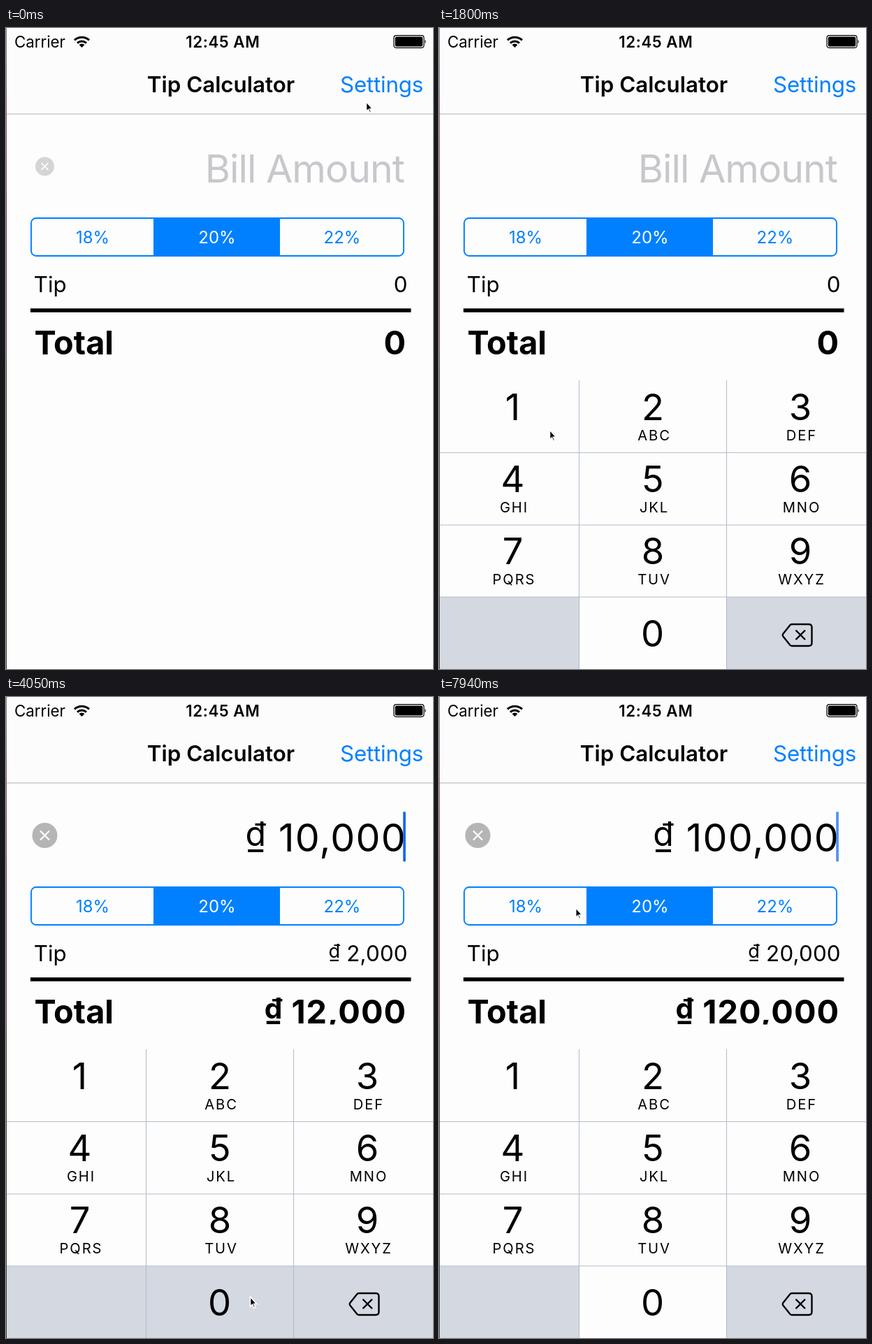
An HTML page that plays this animation: 611 px wide and 917 px high, repeating every 8 s.

```html
<!DOCTYPE html>
<html lang="en">
<head>
<meta charset="utf-8">
<title>Tip Calculator</title>
<style>
  html, body { margin: 0; width: 100%; height: 100%; overflow: hidden; background: #fdfdfd; }
  svg { display: block; width: 611px; height: 917px; font-family: Inter, "Noto Sans", sans-serif; }
  .mid { text-anchor: middle; }
  .end { text-anchor: end; }
  .blue { fill: #0080ff; }
  .body { font-size: 31.3px; }
  .status { font-size: 22.3px; }
  .seg { font-size: 24px; text-anchor: middle; }
  .amount { font-size: 55.5px; text-anchor: end; }
  .total { font-size: 46.8px; font-weight: 700; }
  .digit { font-size: 52.5px; text-anchor: middle; }
  .letters { font-size: 20.2px; letter-spacing: 1.9px; text-anchor: middle; }
  .dong { font-size: .87em; baseline-shift: .17em; }
</style>
</head>
<body>
<svg viewBox="0 0 611 917">
  <defs>
    <linearGradient id="edge" x2="0" y2="1">
      <stop offset="0" stop-color="#8a7c80"/>
      <stop offset=".3" stop-color="#6b3a48"/>
      <stop offset=".5" stop-color="#6b3a48"/>
      <stop offset=".54" stop-color="#34452f"/>
      <stop offset="1" stop-color="#34452f"/>
    </linearGradient>
    <clipPath id="totalBox"><rect y="410" width="611" height="58.5"/></clipPath>
  </defs>
  <rect width="611" height="917" fill="#fdfdfd"/>

  <!-- status and navigation bars -->
  <rect width="611" height="122.5" fill="#fcfcfc"/>
  <rect y="122.5" width="611" height="1" fill="#b2b2b4"/>
  <text class="status" x="12" y="28">Carrier</text>
  <g fill="none" stroke="#000" stroke-width="3">
    <path d="M98 17.3A15.3 15.3 0 0 1 119 17.3"/>
    <path d="M102 21.6A9.5 9.5 0 0 1 115 21.6"/>
  </g>
  <path d="M108.5 28L104.6 24.1A5.6 5.6 0 0 1 112.4 24.1Z"/>
  <text class="status mid" x="310.3" y="28" font-weight="600" letter-spacing=".6">12:45 AM</text>
  <rect x="555" y="10.7" width="43" height="17.6" rx="3.5" fill="none" stroke="#000" stroke-width="1.2"/>
  <rect x="556.8" y="12.5" width="39.4" height="14" rx="2"/>
  <path d="M599.5 16.5Q601.8 19.5 599.5 22.5Z"/>
  <text class="body mid" x="307.5" y="92" font-weight="600">Tip Calculator</text>
  <text class="body blue end" x="597" y="92" letter-spacing="-.2">Settings</text>

  <!-- bill -->
  <g id="clear">
    <circle r="18" fill="#b5b5b5"/>
    <path d="M-6.5-6.5L6.5 6.5M6.5-6.5L-6.5 6.5" stroke="#fff" stroke-width="2.2"/>
  </g>
  <text id="hint" class="amount" x="570" y="221" fill="#c7c7cc" letter-spacing="-1">Bill Amount</text>
  <text id="bill" class="amount" x="573" y="221" letter-spacing="1.2"></text>
  <rect id="caret" x="568.2" y="164" width="3.7" height="71.5" rx="1.5" fill="#1268ec"/>

  <!-- tip rate -->
  <rect x="36" y="272" width="533" height="54" rx="7" fill="none" stroke="#0080ff" stroke-width="1.9"/>
  <rect x="211" y="271.5" width="181" height="55" fill="#0080ff"/>
  <text class="seg blue" x="124" y="307.5">18%</text>
  <text class="seg" x="302" y="307.5" fill="#fff">20%</text>
  <text class="seg blue" x="481" y="307.5">22%</text>

  <text class="body" x="39.8" y="378">Tip</text>
  <text id="tip" class="body end" x="574.8" y="378" letter-spacing=".2"></text>
  <rect x="35" y="401.2" width="544.5" height="5.5"/>
  <g clip-path="url(#totalBox)">
    <text class="total" x="40.5" y="466.5">Total</text>
    <text id="total" class="total end" x="573" y="466.5" letter-spacing="1"></text>
  </g>

  <g id="keyboard">
    <rect y="504" width="611" height="413" fill="#fdfdfd"/>
    <path d="M0 814H200V917H0ZM412 814H611V917H412Z" fill="#d4d8e0"/>
    <rect id="keyOne" y="504" width="200" height="103" fill="#d4d8e0"/>
    <rect id="keyZero" x="201" y="814" width="211" height="103" fill="#d4d8e0"/>
    <path d="M200.5 504V917M411.5 504V917M0 607.5H611M0 711H611M0 814H611" stroke="#b4becb" stroke-width="1.1"/>
    <g id="keys"></g>
    <path d="M505 853H529Q533.5 853 533.5 857.5V879.5Q533.5 884 529 884H505Q503.5 884 502.5 883L492.5 870.5Q491 868.5 492.5 866.5L502.5 854Q503.5 853 505 853ZM510.5 861.5L524 875M524 861.5L510.5 875"
      fill="none" stroke="#000" stroke-width="2.4" stroke-linejoin="round"/>
  </g>

  <rect width="1" height="917" fill="url(#edge)"/>
  <path id="pointer" d="M0 0V14L3 11.2L5.2 16L7.2 15.1L5.2 10.3H9Z" stroke="#fff" stroke-width="1.6"/>
</svg>
<script>
const LOOP = 8000;
const $ = id => document.getElementById(id);
const clamp = v => Math.max(0, Math.min(1, v));

const letters = ["", "ABC", "DEF", "GHI", "JKL", "MNO", "PQRS", "TUV", "WXYZ"];
const columns = [105.5, 306, 517];
$("keys").innerHTML = letters.map((label, i) => {
  const x = columns[i % 3], y = 561 + 103 * Math.floor(i / 3);
  return `<text class="digit" x="${x}" y="${y}">${i + 1}</text>` +
    `<text class="letters" x="${x + 2}" y="${y + 29}">${label}</text>`;
}).join("") + '<text class="digit" x="305.5" y="884.5">0</text>';

// [time, bill]
const bills = [[0, 0], [2250, 1], [2700, 10], [3150, 100], [3900, 1000], [4050, 10000], [4350, 100000]];
// [from, to] of each press on the zero key
const zeroPresses = [[2550, 2700], [2850, 3150], [3750, 3900], [4050, 4500]];
// [time, x, y]
const route = [
  [0, 515.5, 105.5], [700, 515.5, 105.5], [1050, 450, 240], [1350, 230, 600], [1500, 172, 648],
  [1800, 158.5, 575], [2150, 158.5, 575], [2550, 349.5, 858], [5900, 349.5, 858], [6890, 350, 853],
  [7340, 290, 600], [7640, 215, 350], [7800, 195.7, 301.5], [LOOP, 195.7, 301.5]
];

const grouped = v => String(v).replace(/\B(?=(\d{3})+$)/g, ",");
const dong = v => `<tspan class="dong">₫</tspan> ${grouped(v)}`;

// The picture advances in 150 ms steps, with one short step before 5990.
const snap = t => t < 5990
  ? Math.floor(t / 150) * 150
  : 5990 + Math.floor((t - 5990) / 150) * 150;

function pointerAt(t) {
  const i = Math.max(1, route.findIndex(p => p[0] > t));
  const [t0, x0, y0] = route[i - 1], [t1, x1, y1] = route[i];
  const k = (t - t0) / (t1 - t0);
  return [x0 + (x1 - x0) * k, y0 + (y1 - y0) * k];
}

function caretAlpha(t) {
  if (t < 150) return 0;
  if (t >= 2250 && t < 4900) return 1;
  const phase = (t - (t < 2250 ? 560 : 4900) + 1000) % 1000;
  return phase < 430 ? clamp(1 - phase / 150) : clamp((phase - 430) / 150);
}

function clearState(t) {
  if (t < 300) return [0.75 - t / 450, 0.55 - t / 350];
  if (t < 2250) return [0, 0];
  const k = clamp((t - 2100) / 300);
  return [0.5 + k / 2, k];
}

const show = (id, on) => $(id).setAttribute("visibility", on ? "visible" : "hidden");

function draw(time) {
  const t = snap(time);
  const bill = bills.filter(b => b[0] <= t).pop()[1];
  $("bill").innerHTML = bill ? dong(bill) : "";
  $("tip").innerHTML = bill ? dong(Math.round(bill * 0.2)) : "0";
  $("total").innerHTML = bill ? dong(Math.round(bill * 1.2)) : "0";
  show("hint", !bill);
  show("keyOne", t >= 1950 && t < 2100);
  show("keyZero", zeroPresses.some(([from, to]) => t >= from && t < to));

  const slide = 413 * clamp(1 - t / 450) ** 2;
  $("keyboard").setAttribute("transform", `translate(0 ${slide})`);
  $("caret").setAttribute("opacity", caretAlpha(t));
  const [scale, alpha] = clearState(t);
  $("clear").setAttribute("transform", `translate(55.5 198) scale(${scale})`);
  $("clear").setAttribute("opacity", clamp(alpha));
  $("pointer").setAttribute("transform", `translate(${pointerAt(t)})`);
}

const start = performance.now();
function tick() {
  draw((performance.now() - start) % LOOP);
  requestAnimationFrame(tick);
}
tick();
</script>
</body>
</html>
```
